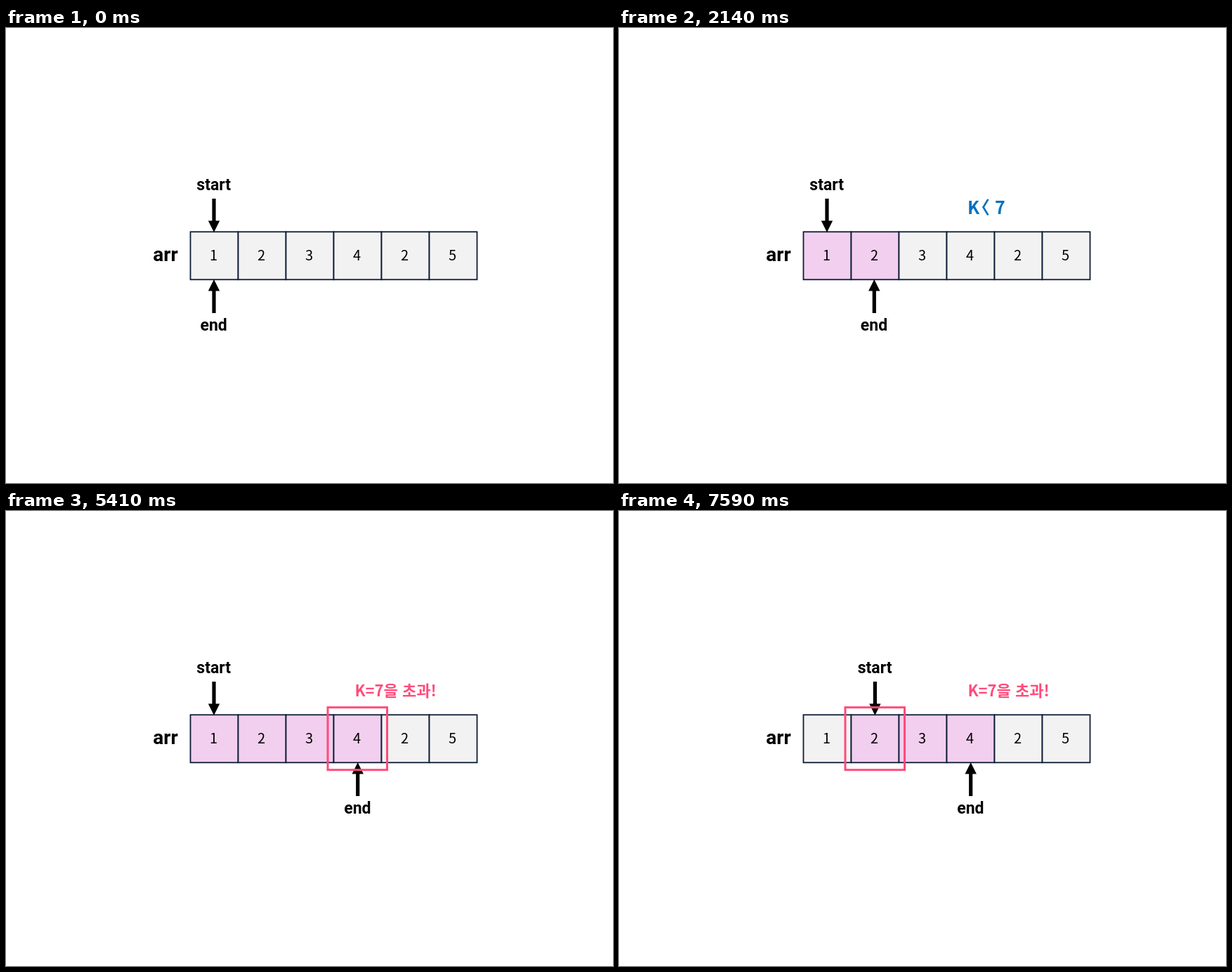
Recreate the animation shown at these times as an HTML page. Size 864 by 648 pixels, loop 8000 ms.

```html
<!DOCTYPE html>
<html lang="ko">
<head>
<meta charset="utf-8">
<title>Two pointers</title>
<style>
  html, body { margin: 0; width: 100%; height: 100%; overflow: hidden; background: #fff; }
  svg { display: block; width: 864px; height: 648px; }
  text { font-family: Roboto, sans-serif; font-weight: 700; }
  .label { font-size: 23px; text-anchor: middle; }
  .name { font-size: 28px; text-anchor: middle; }
  .cell { fill: #f2f2f2; stroke: #0e1c36; stroke-width: 1.8; }
  .cell.on { fill: #f2cfee; }
  .digit, .note { font-family: "Noto Sans CJK KR", "Noto Sans CJK", "Noto Sans CJK JP", sans-serif; }
  .digit { font-size: 20px; font-weight: 400; text-anchor: middle; }
  .note { font-size: 22px; font-weight: 900; }
  .blue { fill: #0070c0; }
  .red { fill: #ff4b7b; }
  #less { font-size: 25px; }
  #frame { fill: none; stroke: #ff4b7b; stroke-width: 3; }
</style>
</head>
<body>
<svg viewBox="0 0 864 648">
  <text class="name" x="227" y="332">arr</text>
  <g id="cells"></g>
  <g id="start">
    <text class="label" x="295.7" y="231">start</text>
    <path d="M293.4 243h5.2v31.5h5.6L296 291l-8.2-16.5h5.6z"/>
  </g>
  <g id="end">
    <text class="label" x="295.7" y="431">end</text>
    <path d="M293.4 406h5.2v-31.5h5.6L296 358l-8.2 16.5h5.6z"/>
  </g>
  <text class="note blue" id="less" y="265"><tspan x="496">K</tspan><tspan x="503">〈</tspan><tspan x="535">7</tspan></text>
  <text class="note red" id="over" x="496.5" y="264">K=7을 초과!</text>
  <text class="note blue" id="move" x="497" y="264">이동</text>
  <rect id="frame" y="279.7" width="84.5" height="89"/>
</svg>
<script>
const LOOP = 8000, CELL = 68, LEFT = 262.5, TOP = 290.3;
const END_SHIFT = [0, 67.3, 136.3, 204.7];

// at: start time; range: pointer cells; lit: cells in the window; frame: outlined cell
const steps = [
  { at: 0,    range: [0, 0], lit: 0 },
  { at: 1050, range: [0, 0], lit: 1, note: 'less' },
  { at: 2140, range: [0, 1], lit: 2, note: 'less' },
  { at: 3230, range: [0, 2], lit: 3, note: 'less' },
  { at: 4320, range: [0, 3], lit: 4 },
  { at: 5410, range: [0, 3], lit: 4, note: 'over', frame: 3 },
  { at: 6500, range: [1, 3], lit: 3, note: 'move' },
  { at: 7590, range: [1, 3], lit: 3, note: 'over', frame: 1 },
];

const byId = id => document.getElementById(id);
const show = (id, visible) => byId(id).setAttribute('visibility', visible ? 'visible' : 'hidden');
const shift = (id, x) => byId(id).setAttribute('transform', `translate(${x})`);

function add(tag, attrs, text = '') {
  const el = document.createElementNS('http://www.w3.org/2000/svg', tag);
  for (const key in attrs) el.setAttribute(key, attrs[key]);
  el.textContent = text;
  return byId('cells').appendChild(el);
}

const cells = [1, 2, 3, 4, 2, 5].map((value, i) => {
  const x = LEFT + i * CELL;
  const cell = add('rect', { class: 'cell', x, y: TOP, width: CELL, height: CELL });
  add('text', { class: 'digit', x: x + CELL / 2 - 1, y: 331 }, value);
  return cell;
});

function render({ range: [first, last], lit, note, frame }) {
  cells.forEach((cell, i) => cell.classList.toggle('on', i >= first && i < first + lit));
  shift('start', first * 68.4);
  shift('end', END_SHIFT[last]);
  for (const id of ['less', 'over', 'move']) show(id, id === note);
  show('frame', frame !== undefined);
  if (frame !== undefined) byId('frame').setAttribute('x', 254 + frame * CELL);
}

let current;
function tick(now) {
  const time = now % LOOP;
  const step = steps.findLast(s => s.at <= time) || steps[0];
  if (step !== current) render(current = step);
  requestAnimationFrame(tick);
}
render(current = steps[0]);
requestAnimationFrame(tick);
</script>
</body>
</html>
```
